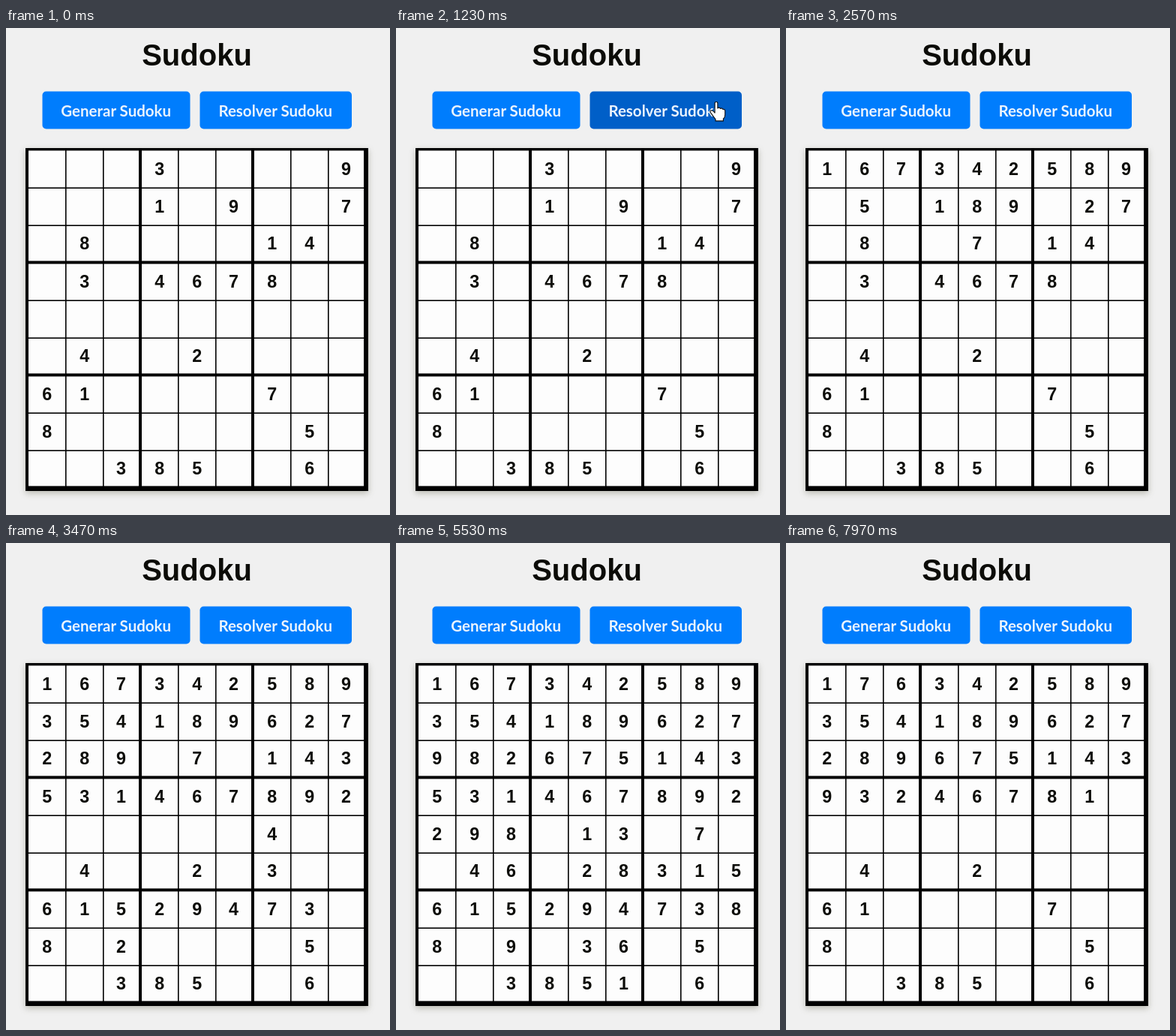
An HTML page for the animation above (8 s loop, 512 by 649 pixels).

```html
<!DOCTYPE html>
<html lang="es">
<head>
<meta charset="utf-8">
<title>Sudoku</title>
<style>
  html, body { margin: 0; width: 100%; height: 100%; overflow: hidden; background: #f0f0f0; }
  svg { display: block; width: 100%; height: 100%; }
  text { text-anchor: middle; font-family: "Liberation Sans", Arial, sans-serif; font-weight: 700; fill: #0c0c08; }
  .title { font-size: 40px; }
  .label { font-family: Lato, "Noto Sans", sans-serif; font-size: 20.5px; fill: #eaf3fd; }
  .digit { font-size: 23.3px; }
  .board { filter: drop-shadow(0 3px 4px rgba(60, 60, 30, .3)); }
</style>
</head>
<body>
<svg id="stage" viewBox="0 0 512 649">
  <rect width="512" height="649" fill="#f0f0f0"/>
  <text class="title" x="254.5" y="50">Sudoku</text>
  <rect x="48.500" y="84.500" width="197" height="50" rx="5" fill="#007dfd"/>
  <rect id="solveBtn" x="258.500" y="84.500" width="202.500" height="50" rx="5"/>
  <text class="label" x="146.700" y="117.700">Generar Sudoku</text>
  <text class="label" x="359.200" y="117.700">Resolver Sudoku</text>
  <rect class="board" x="26" y="160" width="457" height="457" fill="#000"/>
  <g id="cells"></g>
  <path id="cursor" fill="#fff" stroke="#111" stroke-width="1.2" stroke-linejoin="round"
    d="M-2 2Q-2 0 0 0Q2 0 2 2V9Q4 7 6 9.5Q8 8 9.5 10.5Q12.5 10 12.5 13V18Q12.5 22 10 24V27H-1V24.5
       Q-4 21 -6 18L-8.500 14.500Q-9 12 -6.500 12Q-4 12.500 -2 15.500Z"/>
</svg>
<script>
const LOOP = 8000, FIRST_STEP = 1550, STEP = 50, MAX_STEPS = 140;
const NS = 'http://www.w3.org/2000/svg';
const PUZZLE = [
  '...3....9', '...1.9..7', '.8....14.',
  '.3.4678..', '.........', '.4..2....',
  '61....7..', '8......5.', '..385..6.'
].join('');

const $ = id => document.getElementById(id);

function add(parent, tag, attrs) {
  const el = document.createElementNS(NS, tag);
  for (const k in attrs) el.setAttribute(k, attrs[k]);
  return parent.appendChild(el);
}

// Solver: backtracking on the cell with the fewest candidates
const row = i => Math.floor(i / 9), col = i => i % 9;
const box = i => Math.floor(row(i) / 3) * 3 + Math.floor(col(i) / 3);
const linked = (a, b) => row(a) === row(b) || col(a) === col(b) || box(a) === box(b);

function candidates(grid, i) {
  return [...'123456789'].filter(n => !grid.some((v, j) => v === n && linked(i, j)));
}

function pickCell(grid) {
  let best = null;
  for (let i = 0; i < 81; i++) {
    if (grid[i] !== '.') continue;
    const options = candidates(grid, i);
    if (!best || options.length < best.options.length) best = { i, options };
    if (best.options.length === 1) break;
  }
  return best;
}

function* solve(grid) {
  const cell = pickCell(grid);
  if (!cell) return true;
  for (const n of cell.options) {
    grid[cell.i] = n;
    yield grid.join('');
    if (yield* solve(grid)) return true;
    grid[cell.i] = '.';
  }
  return false;
}

const states = [PUZZLE];
for (const s of solve([...PUZZLE])) {
  states.push(s);
  if (states.length > MAX_STEPS) break;
}

// Board
const TOP = 133.4;
const start = k => 30 + 50 * k + (k % 3 ? 0.6 : k ? 1 : 0);
const end = k => 79 + 50 * k - (k % 3 === 2 ? 2 : 0);
const middle = k => 54.8 + 50 * k - (k % 3 === 2 ? 1.2 : 0);

const digits = [...PUZZLE].map((_, i) => {
  const c = col(i), r = row(i);
  add($('cells'), 'rect', {
    x: start(c), y: start(r) + TOP,
    width: end(c) - start(c), height: end(r) - start(r), fill: '#fdfdfd'
  });
  return add($('cells'), 'text', { class: 'digit', x: middle(c), y: middle(r) + TOP + 7.8 });
});

// Motion
function ease(t, from, to) {
  const p = Math.min(1, Math.max(0, (t - from) / (to - from)));
  return p * p * (3 - 2 * p);
}
const mix = (a, b, p) => a + (b - a) * p;

let shown = -1;
function render(t) {
  const step = Math.min(states.length - 1, Math.max(0, Math.floor((t - FIRST_STEP) / STEP) + 1));
  if (step !== shown) {
    digits.forEach((el, i) => { el.textContent = states[step][i].replace('.', ''); });
    shown = step;
  }

  const hover = ease(t, 940, 1220) - ease(t, 1730, 2030);
  const rgb = [[0, 0], [125, 95], [253, 200]].map(([a, b]) => Math.round(mix(a, b, hover)));
  $('solveBtn').setAttribute('fill', `rgb(${rgb})`);

  const enter = ease(t, 870, 1120), leave = ease(t, 1650, 1850);
  const x = mix(530, 427, enter) + 110 * leave;
  const y = mix(140, 98.5, enter) + 25 * leave;
  $('cursor').setAttribute('transform', `translate(${x} ${y}) scale(.94)`);
  $('cursor').setAttribute('visibility', t > 870 && t < 1850 ? 'visible' : 'hidden');
}

const t0 = performance.now();
function tick() {
  render((performance.now() - t0) % LOOP);
  requestAnimationFrame(tick);
}
tick();
</script>
</body>
</html>
```
